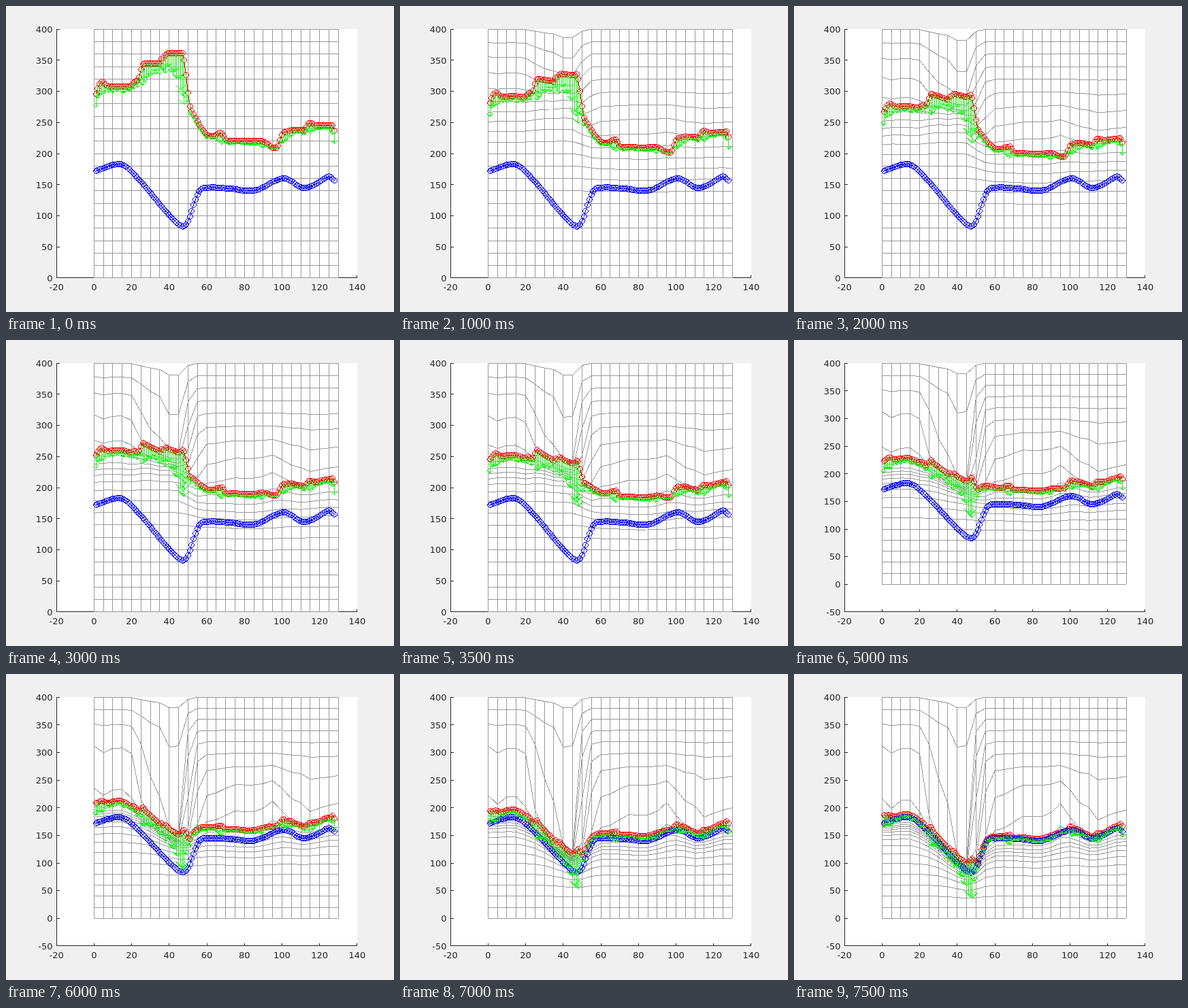
Write an HTML page that moves like this. It is 570x450 px and loops after 8000 ms.

```html
<!DOCTYPE html>
<html lang="en">
<head>
<meta charset="utf-8">
<title>Curve registration</title>
<style>
  html, body { margin: 0; width: 100%; height: 100%; overflow: hidden; background: #f0f0f0; }
  svg { display: block; width: 570px; height: 450px; }
  path { fill: none; stroke-width: 1; shape-rendering: crispEdges; }
  text { font: 13px "DejaVu Sans", sans-serif; fill: #262626; }
</style>
</head>
<body>
<svg viewBox="0 0 570 450">
  <rect x="74" y="34" width="442" height="366" fill="#fff" shape-rendering="crispEdges"/>
  <path id="axes" stroke="#262626"/>
  <path id="mesh" stroke="#999"/>
  <path id="moving" stroke="#f00"/>
  <path id="fixed" stroke="#00f"/>
  <path id="arrows" stroke="#0f0"/>
  <g id="labels"></g>
</svg>
<script>
const COUNT = 128, STEPS = 16, STEP_MS = 500;
const COLS = 27, ROWS = 21;
const REACH = 37;      // vertical reach of the moving curve
const DURATION = 15.7; // steps the curve needs to arrive
const $ = id => document.getElementById(id);

// The moving curve is a chain of soft steps: centre, width, rise.
const RAMPS = [
  [1.5, 5, 29], [6, 4, -7], [20.5, 3, 9], [24.7, 3.5, 28], [35.7, 1.5, 9], [37.8, 1, 7],
  [49.3, 4.6, -79], [54.5, 15, -54], [65, 3, 5], [69.3, 3, -13], [92.5, 7, -11],
  [99, 4, 25], [103.5, 3, 4], [113, 2.5, 11], [117, 4, -4], [127.8, 1, -11]
];
// The fixed curve is a smooth spline through these points.
const KEYS = [
  [1, 172], [12, 183], [17, 179], [25, 155], [40, 101], [47, 83], [50, 91], [55, 134], [58, 144.5],
  [75, 143], [81, 140], [87, 142], [101, 160], [111, 145], [118, 151], [125, 163], [128, 157]
];

const clamp = t => Math.max(0, Math.min(1, t));
const smooth = t => t * t * (3 - 2 * t);
const gauss = (d, sigma) => Math.exp(-d * d / (2 * sigma * sigma));
const each = f => Array.from({ length: COUNT }, (_, i) => f(i + 1));
const edge = x => Math.exp(-Math.min(x - 1, COUNT - x) / 1.3);

const ramps = x => RAMPS.reduce(
  (y, [centre, width, rise]) => y + rise * smooth(clamp((x - centre) / width + 0.5)), 286);

function slope(k) {
  const a = KEYS[Math.max(0, k - 1)], b = KEYS[Math.min(KEYS.length - 1, k + 1)];
  return (b[1] - a[1]) / (b[0] - a[0]);
}

function spline(x) {
  const k = Math.max(1, KEYS.findIndex(p => p[0] >= x));
  const [x0, y0] = KEYS[k - 1], [x1, y1] = KEYS[k];
  const w = x1 - x0, t = (x - x0) / w, u = 1 - t;
  return y0 + (y1 - y0) * smooth(t) + w * t * u * (slope(k - 1) * u - slope(k) * t);
}

// Normalised weights of the curve points around x.
function weights(x, sigma) {
  const near = each(n => [n - 1, gauss(n - x, sigma)]).filter(p => p[1] > 0.0003);
  const sum = near.reduce((s, p) => s + p[1], 0);
  return near.map(([i, w]) => [i, w / sum]);
}
const blur = (values, sigma) =>
  each(x => weights(x, sigma).reduce((sum, [i, w]) => sum + w * values[i], 0));

const start = each(ramps), goal = each(spline);
const speed = start.map((y, i) => (y - goal[i]) / DURATION);
const drift = blur(speed, 1.5).map((v, i) => v * (1 - 0.12 * edge(i + 1)));

// Arrows are long where the curve stands out from its surroundings.
const around = blur(start, 4);
const pull = start.map((y, i) => {
  const noise = 1 + 0.3 * Math.sin(i * i * 1.7 + i);
  return speed[i] * noise + 2 * Math.max(0, y - around[i]) + 14 * edge(i + 1);
});

// The foot of the cliff lags behind midway.
const curveAt = s => start.map((y, i) =>
  y - drift[i] * s + 14 * gauss(i - 50, 2) * Math.sin(Math.PI * s / STEPS));

// The grid is dragged along by the curve, fading with distance from it.
function flow() {
  const SUB = 4;
  const near = Array.from({ length: COLS }, (_, c) => weights(5 * c, 2.2));
  let grid = near.map(() => Array.from({ length: ROWS }, (_, r) => 20 * r));
  const states = [grid];
  for (let k = 0; k < (STEPS - 1) * SUB; k++) {
    const curve = curveAt((k + 0.5) / SUB);
    grid = grid.map((col, c) => col.map(y => {
      let v = 0;
      for (const [i, w] of near[c]) v += w * speed[i] * gauss(y - curve[i], REACH);
      return y - v / SUB;
    }));
    if ((k + 1) % SUB === 0) states.push(grid);
  }
  return states;
}
const meshes = flow();

const px = x => 74.13 + (x + 20) * 441.75 / 160;
const snap = v => Math.floor(v) + 0.5;
const pt = (x, y) => x.toFixed(2) + " " + y.toFixed(2);
const line = pts => "M" + pts.map(p => pt(p[0], p[1])).join("L");
const ring = ([x, y]) => `M${pt(x - 1, y - 4)}h2l3 3v2l-3 3h-2l-3 -3v-2z`;

function drawAxes(low, py) {
  let d = "M74.5 34V399.5H516", text = "";
  for (let v = low; v <= 400; v += 50) {
    const y = py(v);
    d += `M74.5 ${y.toFixed(2)}h4.5`;
    text += `<text x="68.5" y="${Math.round(y + 4.8)}" text-anchor="end">${v}</text>`;
  }
  for (let v = -20; v <= 140; v += 20) {
    const x = px(v).toFixed(2);
    d += `M${x} 399.5v-4`;
    text += `<text x="${x}" y="418" text-anchor="middle">${v}</text>`;
  }
  $("axes").setAttribute("d", d);
  $("labels").innerHTML = text;
}

function drawCurve(id, values, py) {
  const pts = values.map((y, i) => [snap(px(i + 1)), snap(py(y))]);
  $(id).setAttribute("d", line(pts) + pts.map(ring).join(""));
}

function drawMesh(grid, py) {
  const nodes = grid.map((col, c) => col.map(y => [px(5 * c), py(y)]));
  let d = nodes.map(line).join("");
  for (let r = 0; r < ROWS; r++) d += line(nodes.map(col => col[r]));
  $("mesh").setAttribute("d", d);
}

function drawArrows(curve, py) {
  let d = "";
  curve.forEach((y, i) => {
    const x = px(i + 1), top = py(y), tip = py(y - pull[i]);
    const head = Math.min(7.5, 1.5 + 0.13 * (tip - top));
    d += line([[x, top], [x, tip]]);
    d += line([[x - head, tip - head], [x, tip], [x + head, tip - head]]);
  });
  $("arrows").setAttribute("d", d);
}

function draw(s) {
  const low = s < 8 ? 0 : -50;
  const py = y => 34.12 + (400 - y) * 365.85 / (400 - low);
  const curve = curveAt(s);
  drawAxes(low, py);
  drawMesh(meshes[s], py);
  drawCurve("moving", curve, py);
  drawCurve("fixed", goal, py);
  drawArrows(curve, py);
}

const begin = performance.now();
let shown = -1;
function tick() {
  const s = Math.floor((performance.now() - begin) / STEP_MS) % STEPS;
  if (s !== shown) draw(shown = s);
  requestAnimationFrame(tick);
}
tick();
</script>
</body>
</html>
```
